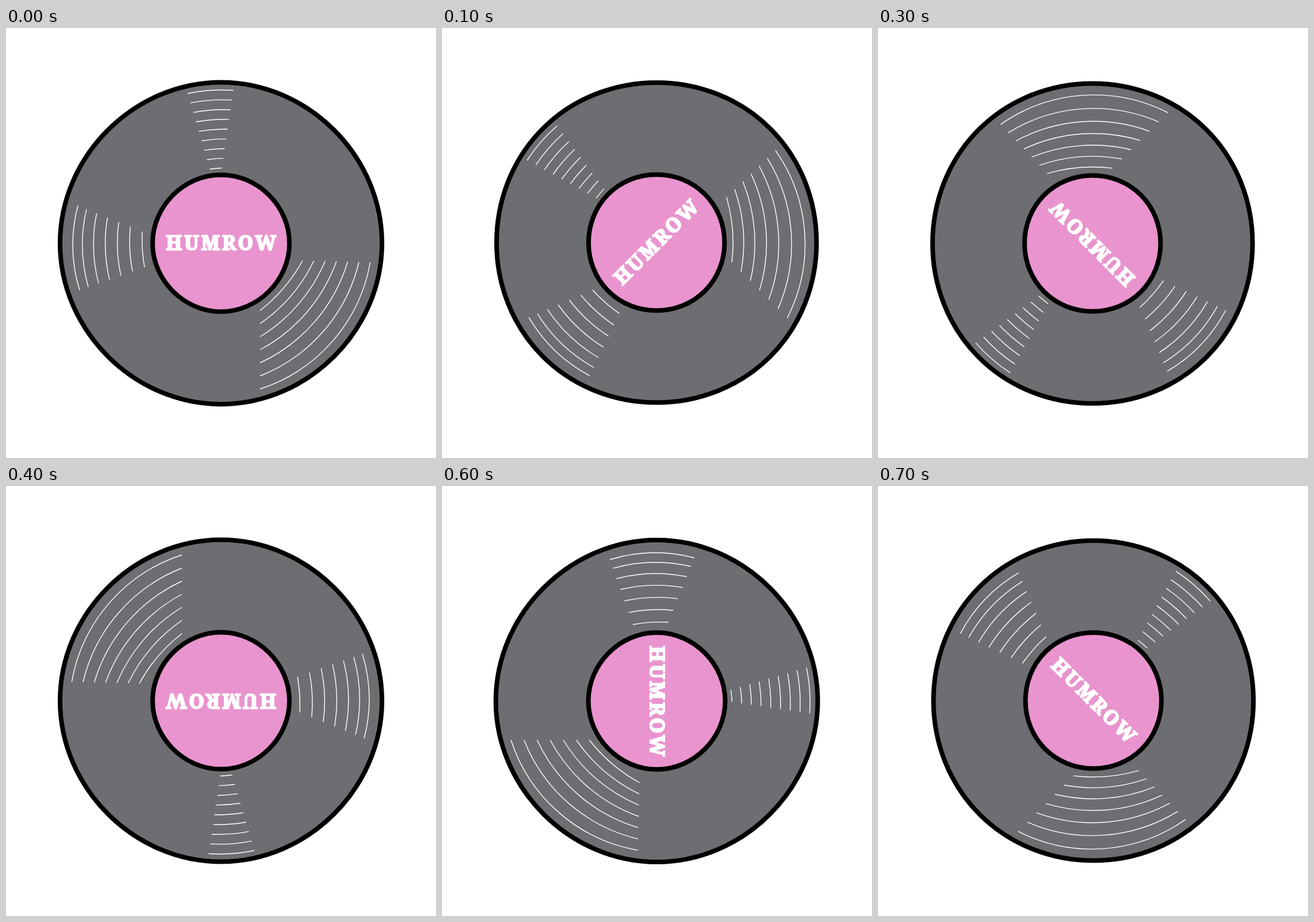
Animation, 748 px wide and 748 px high, one loop 800 ms. Source, as an HTML page:

```html
<!DOCTYPE html>
<html lang="en">
<head>
<meta charset="utf-8">
<title>Spinning record</title>
<style>
  html, body { margin: 0; width: 100%; height: 100%; overflow: hidden; background: #fff; }
  svg { display: block; width: 100%; height: 100%; }
  .disc { stroke: #000; stroke-width: 8; }
  text {
    font: 900 34px "Noto Serif", serif;
    letter-spacing: 4px;
    text-anchor: middle;
    fill: #fff;
    stroke: #fff;
    stroke-width: 2.4;
  }
</style>
</head>
<body>
<svg viewBox="0 0 748 748">
  <g id="spin">
    <path id="vinyl" class="disc" fill="#6d6e71"/>
    <path id="grooves" fill="none" stroke="#fff" stroke-width="1.4"/>
    <path id="label" class="disc" fill="#e994ce"/>
    <text x="376" y="385.6">HUMROW</text>
  </g>
</svg>
<script>
const $ = id => document.getElementById(id);

// Disc of four curves, a touch flatter on its diagonals than a circle.
function disc(r) {
  const cx = 374, cy = 374.4, k = 0.541 * r;
  return `M${cx} ${cy - r}` +
    `c${k} 0 ${r} ${r - k} ${r} ${r}` +
    `s${k - r} ${r} ${-r} ${r}` +
    `s${-r} ${k - r} ${-r} ${-r}` +
    `s${r - k} ${-r} ${r} ${-r}z`;
}

// Clockwise arcs blended from one (x1, y1, x2, y2) to another.
function fan(count, radius, from, to, bend = 1) {
  let d = "";
  for (let i = 0; i < count; i++) {
    const t = (i / (count - 1)) ** bend;
    const [x1, y1, x2, y2] = from.map((v, j) => v + (to[j] - v) * t);
    d += `M${x1} ${y1}A${radius} ${radius} 0 0 1 ${x2} ${y2}`;
  }
  return d;
}

$("vinyl").setAttribute("d", disc(280));
$("label").setAttribute("d", disc(119));
$("grooves").setAttribute("d",
  fan(7, 283, [516, 404.5, 442, 491.5], [633.5, 407.5, 442, 628]) +
  fan(7, 270, [128, 456, 125, 309], [241, 416, 237, 354], 1.12) +
  fan(9, 285, [316, 114, 395.5, 108.5], [354.5, 245.5, 375.5, 243.5]));

// Eighth turns; diagonal poses sit slightly off-centre.
function draw(time) {
  const step = Math.floor(time / 100) % 8;
  const shift = step % 2 ? -1.5 : 0;
  $("spin").setAttribute("transform",
    `rotate(${-45 * step} 374 374) translate(0 ${shift})`);
}

const start = performance.now();
function tick() {
  draw(performance.now() - start);
  requestAnimationFrame(tick);
}
tick();
</script>
</body>
</html>
```
